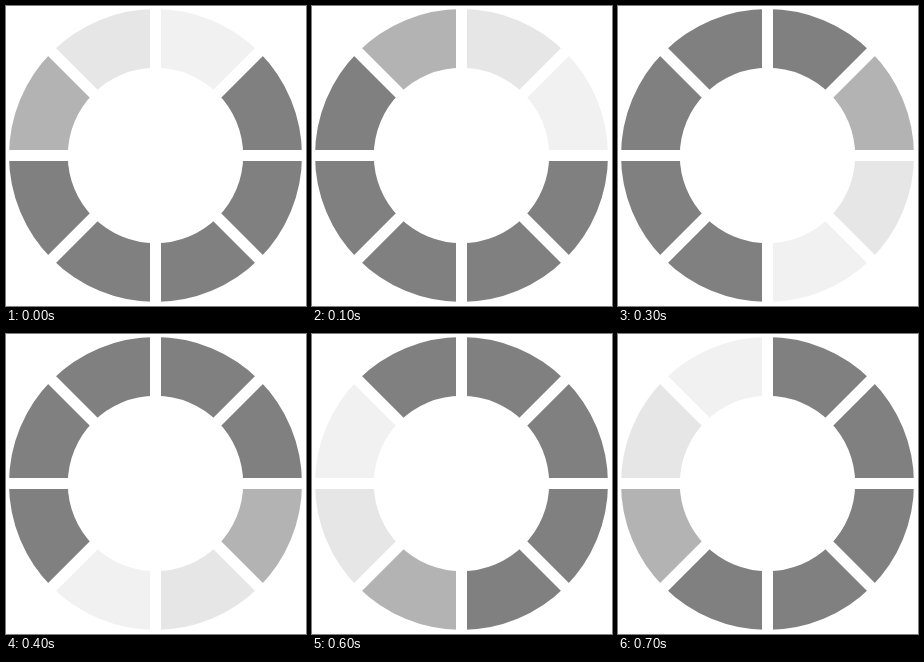
These frames come from a looping animation (300x300 px, 0.8 s). An HTML page:

```html
<!DOCTYPE html>
<html lang="en">
<head>
<meta charset="utf-8">
<title>Loading ring</title>
<style>
  html, body { margin: 0; width: 100%; height: 100%; overflow: hidden; background: #fff; }
  svg { display: block; width: 100vw; height: 100vh; }
  .seg {
    fill: none;
    stroke: #808080;
    stroke-width: 58.8;
    transform: rotate(calc(var(--i) * 45deg));
    animation: fade 800ms step-end calc(var(--i) * 100ms - 800ms) infinite;
  }
  .gaps { stroke: #fff; stroke-width: 11; }
  @keyframes fade {
    0% { stroke: #f1f1f1; }
    12.5% { stroke: #e6e6e6; }
    25% { stroke: #b3b3b3; }
    37.5%, 100% { stroke: #808080; }
  }
</style>
</head>
<body>
<svg viewBox="0 0 300 300">
  <defs><path id="arc" d="M0-117.1A117.1 117.1 0 0 1 82.8-82.8"/></defs>
  <g transform="translate(149.5 149.5)">
    <use href="#arc" class="seg" style="--i:0"/>
    <use href="#arc" class="seg" style="--i:1"/>
    <use href="#arc" class="seg" style="--i:2"/>
    <use href="#arc" class="seg" style="--i:3"/>
    <use href="#arc" class="seg" style="--i:4"/>
    <use href="#arc" class="seg" style="--i:5"/>
    <use href="#arc" class="seg" style="--i:6"/>
    <use href="#arc" class="seg" style="--i:7"/>
    <path class="gaps" d="M0-150V150M-150 0H150M-110-110L110 110M-110 110L110-110"/>
  </g>
</svg>
</body>
</html>
```
